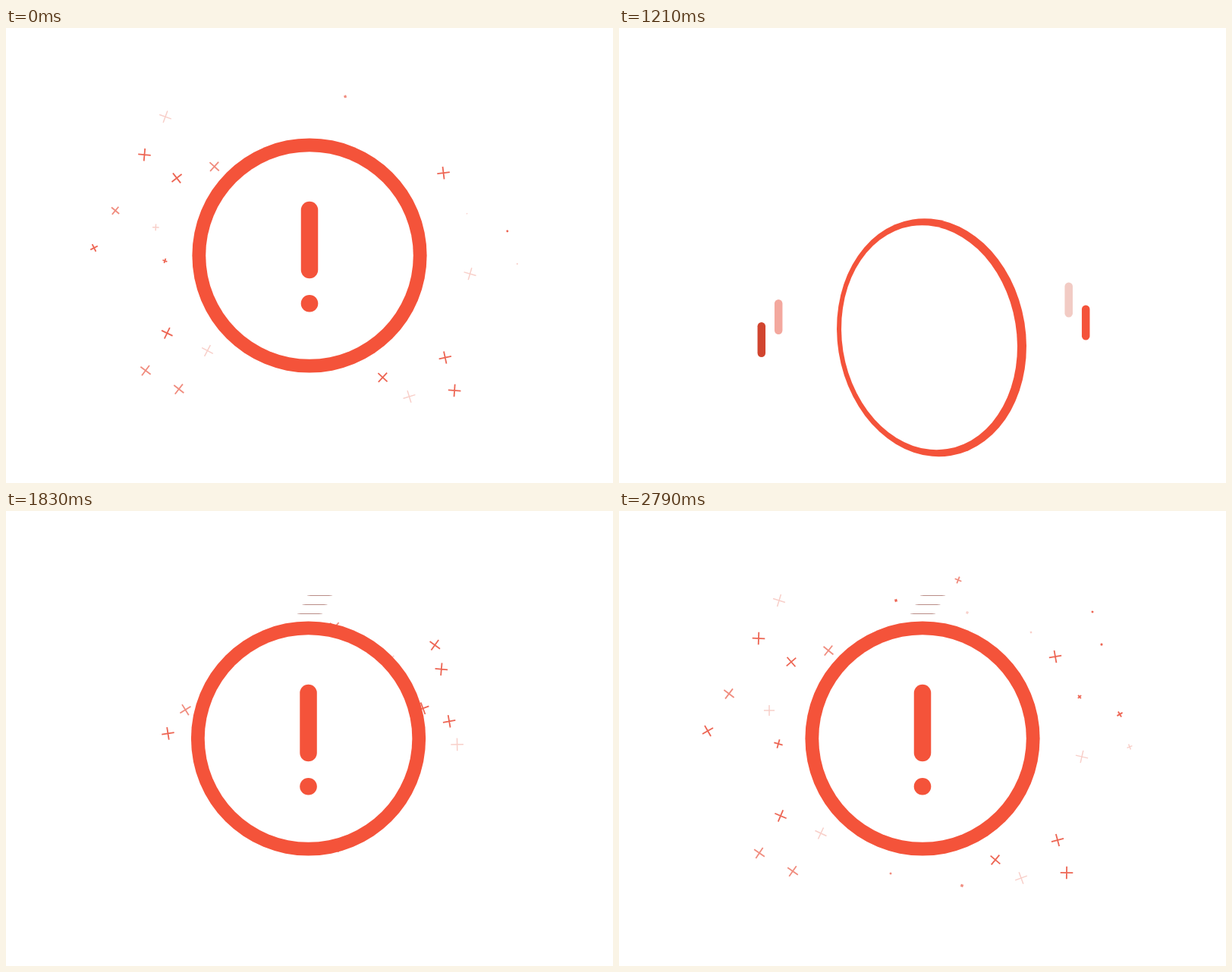
Write an HTML page with a canvas that moves like this. It is 800x600 px and loops after 2830 ms.

```html
<!DOCTYPE html>
<html lang="en">
<head>
<meta charset="utf-8">
<title>Alert icon</title>
<style>
html, body { margin: 0; width: 100%; height: 100%; overflow: hidden; background: #fff; }
canvas { display: block; width: 800px; height: 600px; }
</style>
</head>
<body>
<canvas id="stage" width="800" height="600"></canvas>
<script>
const ctx = document.getElementById('stage').getContext('2d');
const LOOP = 2830, STEPS = 68, STEP = LOOP / STEPS;
const RED = '#f4533a';

// Moments of the loop, counted in steps
const DROP = 13, GONE = 21, RISE = 26, FACE = 29, APEX = 35, LAND = 42, LAST = 67;

// Where each cross has drifted to by the last step, in order of birth
const BURST = [
  { color: '#f8cfc9', width: 1.5, ends: [[543, 160], [459, 134], [673, 311],
    [198, 263], [266, 425], [211, 118], [610, 324], [530, 484]] },
  { color: '#f08c7e', width: 1.8, ends: [[358, 478], [452, 494], [447, 91],
    [145, 241], [185, 451], [229, 475], [276, 184]] },
  { color: '#ed6553', width: 1.8, ends: [[624, 133], [636, 176], [365, 118],
    [607, 245], [660, 268], [210, 307], [117, 290], [213, 402], [578, 434],
    [496, 460], [590, 477], [184, 168], [575, 192], [227, 199]] }
];

const clamp01 = v => Math.max(0, Math.min(1, v));
const part = (n, from, to) => clamp01((n - from) / (to - from));
const mix = (a, b, u) => a + (b - a) * u;
const smooth = u => u * u * (3 - 2 * u);
const hump = u => Math.sin(Math.PI * u);
const backOut = (u, s) => 1 + (s + 1) * (u - 1) ** 3 + s * (u - 1) ** 2;

function oval(x, y, rx, ry, turn, color) {
  ctx.fillStyle = color;
  ctx.beginPath();
  ctx.ellipse(x, y, rx, ry, turn, 0, 2 * Math.PI);
  ctx.fill();
}

function pill(x, y, w, h, color) {
  ctx.fillStyle = color;
  ctx.beginPath();
  ctx.roundRect(x - w / 2, y, w, h, Math.min(w, h) / 2);
  ctx.fill();
}

function iconY(n) {
  if (n < GONE) return 300 + 460 * part(n, DROP, GONE) ** 2.5;
  if (n < APEX) return 221 + 5.2 * (APEX - n) ** 2;
  return mix(221, 300, smooth(part(n, APEX, LAND))) + hump(part(n, 47, LAST));
}

function drawIcon(n) {
  // 0: turned sideways, 1: facing the viewer
  const u = n < GONE ? 1 : part(n, FACE, LAND);
  const lean = 1 - u ** 8;
  const tilt = -0.16 * (1 - 0.3 * u) * Math.cos(1.5 * Math.PI * u);
  const stroke = Math.min(17.8, 9 + 12 * u);
  const x = 400 - 3.6 * hump(part(n, LAND, LAND + 15));
  const y = iconY(n);
  const ringX = x + 12 * lean;
  const rx = mix(124, 154.6, u), ry = mix(157.8, 154.6, u);
  oval(ringX, y, rx, ry, tilt, RED);
  oval(ringX - 3 * lean, y, rx - stroke, ry - stroke, tilt, '#fff');

  const bar = n < GONE ? 1 : backOut(part(n, 31, LAND), 1.83);
  const dot = n < GONE ? 1 : backOut(part(n, 33, LAND), 3.07);
  if (bar > 0) pill(x, y - 71.3, 22.5, 101.5 * bar, RED);
  if (dot > 0) oval(x, y + 63.3, 11.3 * dot, 11.3 * dot, 0, RED);
}

function drawCross(x, y, arm, turn) {
  ctx.save();
  ctx.translate(x, y);
  ctx.rotate(turn);
  ctx.beginPath();
  ctx.moveTo(-arm, 0);
  ctx.lineTo(arm, 0);
  ctx.moveTo(0, -arm);
  ctx.lineTo(0, arm);
  ctx.stroke();
  ctx.restore();
}

// Crosses fly out from the centre, slow down and shrink away
function drawBurst(n) {
  const travel = age => 1 - Math.exp(-0.105 * age);
  for (const { color, width, ends } of BURST) {
    ctx.strokeStyle = color;
    ctx.lineWidth = width;
    ends.forEach(([x, y], i) => {
      const death = 67.5 + 13.3 * (i / (ends.length - 1)) ** 2.2;
      const birth = death - 35.6;
      const arm = 8.3 * part(n, death, death - 3);
      if (n < birth || !arm) return;
      const far = travel(n - birth) / travel(LAST - birth);
      const turn = ((i * 137 + x) % 90 + 3 * n) * Math.PI / 180;
      drawCross(mix(400, x, far), mix(300, y, far), arm, turn);
    });
  }
}

function drawStreaks(n) {
  const length = 46 * Math.min(part(n, 26, FACE), part(n, 34, 30));
  const y = 400 - 45 * (n - FACE) + 4 * (n - FACE) ** 2 - length / 2;
  pill(187.8, y + 11, 10.5, length, '#d1452f');
  pill(210.2, y - 19, 10.5, length, '#f3a89e');
  pill(592.7, y - 41.5, 10.5, length, '#f2cbc4');
  pill(615.2, y - 11.5, 10.5, length, RED);
}

// Thin lines left above the ring as it lands
function drawTraces(n) {
  for (let i = 0; i < 3 && n >= 39 + i; i++) {
    oval(413.5 - 6.5 * i, 111.5 + 12 * i, 17, 0.6, 0, '#b98c86');
  }
}

function draw(n) {
  ctx.fillStyle = '#fff';
  ctx.fillRect(0, 0, 800, 600);
  if (n <= DROP) drawBurst(n + STEPS);
  if (n >= LAND - 1) drawBurst(n);
  if (n > RISE && n < 34) drawStreaks(n);
  if (n < GONE || n >= RISE) drawIcon(n);
  drawTraces(n);
}

const start = performance.now();
function tick() {
  const t = (performance.now() - start) % LOOP;
  draw(Math.min(LAST, Math.floor(t / STEP + 0.1)));
  requestAnimationFrame(tick);
}
tick();
</script>
</body>
</html>
```
